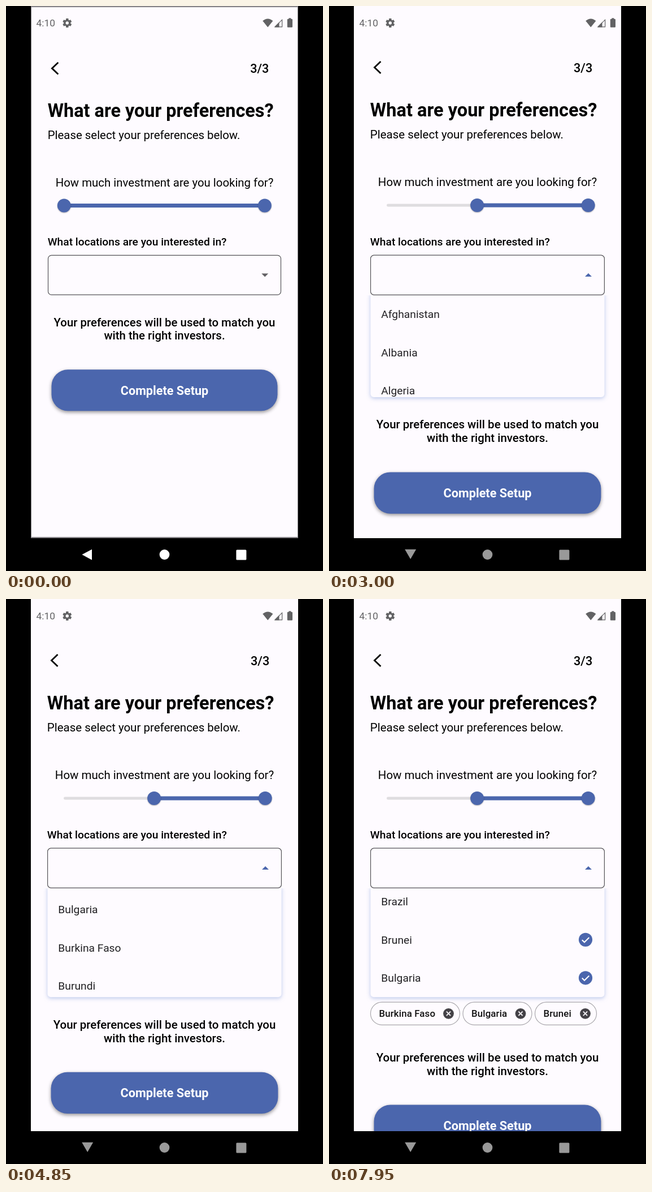
An HTML page with a canvas for the animation above (8000 ms loop, 561 by 998 pixels).

```html
<!DOCTYPE html>
<html lang="en">
<head>
<meta charset="utf-8">
<title>Preferences</title>
<style>
  html, body { margin: 0; width: 100%; height: 100%; overflow: hidden; background: #000; }
  canvas { display: block; width: 100%; height: 100%; }
</style>
</head>
<body>
<canvas id="stage" width="561" height="998"></canvas>
<script>
const ctx = document.getElementById('stage').getContext('2d');
const LOOP = 8000, STEP = 50;
const BLUE = '#4b66ad', PAGE = '#fefbff', STATUS = '#626264';
const DP = 1.2045;
const ROW = 56 * DP, LIST_HEIGHT = 160 * DP, CHIP_HEIGHT = 48 * DP;
const TRACK = { left: 102, right: 458.7, y: 352 };
const COUNTRIES = ['Afghanistan', 'Albania', 'Algeria', 'Andorra', 'Angola', 'Antigua and Barbuda',
  'Argentina', 'Armenia', 'Australia', 'Austria', 'Azerbaijan', 'Bahamas', 'Bahrain', 'Bangladesh',
  'Barbados', 'Belarus', 'Belgium', 'Belize', 'Benin', 'Bhutan', 'Bolivia', 'Bosnia and Herzegovina',
  'Botswana', 'Brazil', 'Brunei', 'Bulgaria', 'Burkina Faso', 'Burundi', 'Cambodia', 'Cameroon'];
const PICKS = [
  { name: 'Burkina Faso', at: 5250, left: 73.5, right: 231.5 },
  { name: 'Bulgaria', at: 5950, left: 237, right: 359 },
  { name: 'Brunei', at: 7350, left: 364.5, right: 473.5 }
];

const progress = (t, from, to) => Math.min(1, Math.max(0, (t - from) / (to - from)));
const smooth = u => u * u * (3 - 2 * u);
const easeOut = u => 1 - (1 - u) ** 3;
// Finger drag that speeds up, then a decelerating fling.
const flick = u => u < 1 / 6 ? 0.231 * (6 * u) ** 2 : 0.231 + 0.769 * easeOut((u - 1 / 6) * 1.2);

function text(str, x, y, sp, { weight = 400, color = '#000', align = 'left', spacing = 0 } = {}) {
  ctx.font = `${weight} ${sp * DP}px Roboto, sans-serif`;
  ctx.letterSpacing = spacing + 'px';
  ctx.textAlign = align;
  ctx.fillStyle = color;
  ctx.fillText(str, x, y);
}
function polygon(points, color) {
  ctx.beginPath();
  points.forEach(([x, y]) => ctx.lineTo(x, y));
  ctx.closePath();
  ctx.fillStyle = color;
  ctx.fill();
}
function polyline(points, color, width) {
  ctx.beginPath();
  points.forEach(([x, y]) => ctx.lineTo(x, y));
  ctx.strokeStyle = color;
  ctx.lineWidth = width;
  ctx.stroke();
}
function circle(x, y, r, color) {
  ctx.beginPath();
  ctx.arc(x, y, r, 0, 7);
  ctx.fillStyle = color;
  ctx.fill();
}
function box(left, top, right, bottom, radius, fill, stroke, width = 1.2) {
  ctx.beginPath();
  ctx.roundRect(left, top, right - left, bottom - top, radius);
  if (fill) { ctx.fillStyle = fill; ctx.fill(); }
  if (stroke) { ctx.strokeStyle = stroke; ctx.lineWidth = width; ctx.stroke(); }
}
function clipped(left, top, right, bottom, draw) {
  ctx.save();
  ctx.beginPath();
  ctx.rect(left, top, right - left, bottom - top);
  ctx.clip();
  draw();
  ctx.restore();
}
function shadowed(color, blur, dy, draw) {
  ctx.save();
  ctx.shadowColor = color;
  ctx.shadowBlur = blur;
  ctx.shadowOffsetY = dy;
  draw();
  ctx.restore();
}

function valueLabel(x, label, scale) {
  if (!scale) return;
  ctx.save();
  ctx.translate(x, TRACK.y);
  ctx.scale(scale * DP, scale * DP);
  ctx.font = '400 14px Roboto, sans-serif';
  ctx.letterSpacing = '0.5px';
  const half = Math.max(16, ctx.measureText(label).width) / 2 + 16;
  polygon([[0, -14], [-8, -22.5], [8, -22.5]], '#656368');
  box(-half, -54, half, -22, 4, '#656368');
  text(label, 0, -33, 14 / DP, { color: '#fff', align: 'center', spacing: 0.5 });
  ctx.restore();
}

function slider(t) {
  const share = 0.449 * smooth(progress(t, 1350, 2050));
  const x = TRACK.left + share * (TRACK.right - TRACK.left);
  const active = progress(t, 1350, 1500) * (1 - progress(t, 2050, 2150));
  box(TRACK.left, 349.6, x, 354.4, 2.4, '#dfdde0');
  box(x, 348.4, TRACK.right, 355.6, 3.6, BLUE);
  if (active) circle(x, TRACK.y, 24 * DP * active, 'rgba(75,102,173,.12)');
  for (const cx of [x, TRACK.right])
    shadowed('rgba(0,0,0,.3)', 2, 1, () => circle(cx, TRACK.y, 12, BLUE));
  return () => {
    valueLabel(x, String(Math.round(share * 100) * 100), active);
    valueLabel(TRACK.right, '10000', active);
  };
}

function dropdown(t, open) {
  if (open) {
    const bottom = 510.5 + LIST_HEIGHT * open;
    clipped(60, 511, 500, 730, () => {
      shadowed('rgba(120,150,215,.5)', 7, 2, () => box(73.5, 505, 487.5, bottom, 6, PAGE));
    });
    const scroll = (25 * ROW - 4) * flick(progress(t, 3650, 4850)) - 121 * flick(progress(t, 6600, 7200));
    clipped(74, 511, 487, bottom, () => COUNTRIES.forEach((name, i) => {
      const y = 544.3 + i * ROW - scroll;
      if (y < 480 || y > 740) return;
      text(name, 92.3, y + 7, 16, { color: '#222124' });
      if (PICKS.some(p => p.name === name && t >= p.at)) {
        circle(454, y, 12.1, BLUE);
        polyline([[447.8, y + 0.3], [452, y + 4.4], [460.3, y - 3.9]], '#fff', 2.1);
      }
    }));
  }
  box(73.6, 440.2, 487.4, 510.3, 6, PAGE, '#555458');
  if (open) polygon([[453, 478], [465, 478], [459, 472]], BLUE);
  else polygon([[453, 472.6], [465, 472.6], [459, 478.6]], '#626064');
}

function chip({ name, left, right }) {
  box(left, 712.2, right, 752.3, 20, PAGE, '#a9a7ac');
  text(name, left + 15, 738.2, 14, { weight: 500, color: '#111', spacing: 0.12 });
  const x = right - 20;
  circle(x, 732.3, 9.4, '#444247');
  polyline([[x - 3.6, 728.7], [x + 3.6, 735.9]], PAGE, 1.8);
  polyline([[x + 3.6, 728.7], [x - 3.6, 735.9]], PAGE, 1.8);
}

function page(t) {
  const scale = 1 - 0.0045 * (1 - progress(t, 0, 250)) ** 2;
  ctx.fillStyle = '#858387';
  ctx.fillRect(44, 0, 473, 940);
  ctx.translate(280.5, 470);
  ctx.scale(scale, scale);
  ctx.translate(-280.5, -470);
  ctx.fillStyle = PAGE;
  ctx.fillRect(44, 0, 473, 940);

  polyline([[91.5, 98], [80.5, 108.5], [91.5, 119]], '#000', 2.8);
  text('3/3', 433, 116.5, 18, { weight: 500 });
  text('What are your preferences?', 72.8, 194.5, 27, { weight: 700 });
  text('Please select your preferences below.', 72.8, 234, 17);
  text('How much investment are you looking for?', 280.5, 318.4, 17, { align: 'center' });
  const labels = slider(t);
  text('What locations are you interested in?', 72.8, 422.8, 16, { weight: 500 });

  const open = easeOut(progress(t, 2850, 3100));
  dropdown(t, open);
  const picked = PICKS.filter(p => t >= p.at);
  picked.forEach(chip);

  ctx.save();
  ctx.translate(0, open * LIST_HEIGHT + (picked.length ? CHIP_HEIGHT : 0));
  const centered = { weight: 500, align: 'center' };
  text('Your preferences will be used to match you', 280.5, 566, 17, centered);
  text('with the right investors.', 280.5, 590, 17, centered);
  shadowed('rgba(0,0,0,.42)', 6, 2.5, () => box(79.6, 643, 481.4, 716.3, 29, BLUE));
  text('Complete Setup', 280.5, 687.5, 18, { weight: 700, color: '#fff', align: 'center' });
  ctx.restore();
  labels();
}

function statusBar() {
  text('4:10', 53.5, 36.4, 14.4, { color: STATUS });
  ctx.save();
  ctx.translate(108.3, 30);
  for (let i = 0; i < 6; i++) {
    box(-2.2, -8, 2.2, -4, 0.6, STATUS);
    ctx.rotate(Math.PI / 3);
  }
  ctx.beginPath();
  ctx.arc(0, 0, 4.4, 0, 7);
  ctx.strokeStyle = STATUS;
  ctx.lineWidth = 3.4;
  ctx.stroke();
  ctx.restore();

  ctx.beginPath();
  ctx.moveTo(463.3, 37.5);
  ctx.lineTo(454.2, 26.2);
  ctx.quadraticCurveTo(463.3, 18.6, 472.4, 26.2);
  ctx.fillStyle = STATUS;
  ctx.fill();
  polygon([[474.5, 37.5], [483.5, 37.5], [483.5, 28.5]], STATUS);
  polyline([[476, 36.9], [488.6, 36.9], [488.6, 24.4], [476, 36.9]], STATUS, 1.2);
  box(497.8, 23, 507, 37.8, 1.2, STATUS);
  box(500.3, 21.4, 504.5, 24, 0, STATUS);
}

function navigation(t) {
  const keyboard = 20 * Math.sin(Math.PI * progress(t, 3050, 3250));
  const level = Math.round(255 - 93 * progress(t, 550, 1150) - 9 * progress(t, 1150, 1500));
  const color = `rgb(${level},${level},${level})`;
  polygon(t < 3000 ? [[134.5, 969], [152, 959.8], [152, 978.6]]
                   : [[134.2, 959.8], [154.2, 959.8], [144.2, 977]], color);
  circle(280.5, 969, 8.9, color);
  box(407.4, 960.4, 425.4, 978.4, 1.5, color);
  if (keyboard > 0.1) {
    const top = 998 - keyboard;
    ctx.fillStyle = '#e7e8ef';
    ctx.fillRect(44, top, 473, 30);
    circle(74, top + 26, 18, '#fff');
    circle(492, top + 19, 4, '#444');
  }
}

function draw(t) {
  ctx.fillStyle = '#000';
  ctx.fillRect(0, 0, 561, 998);
  clipped(44, 0, 517, 940, () => page(t));
  statusBar();
  navigation(t);
}

function tick() {
  draw(Math.floor(performance.now() % LOOP / STEP) * STEP);
  requestAnimationFrame(tick);
}
tick();
</script>
</body>
</html>
```
